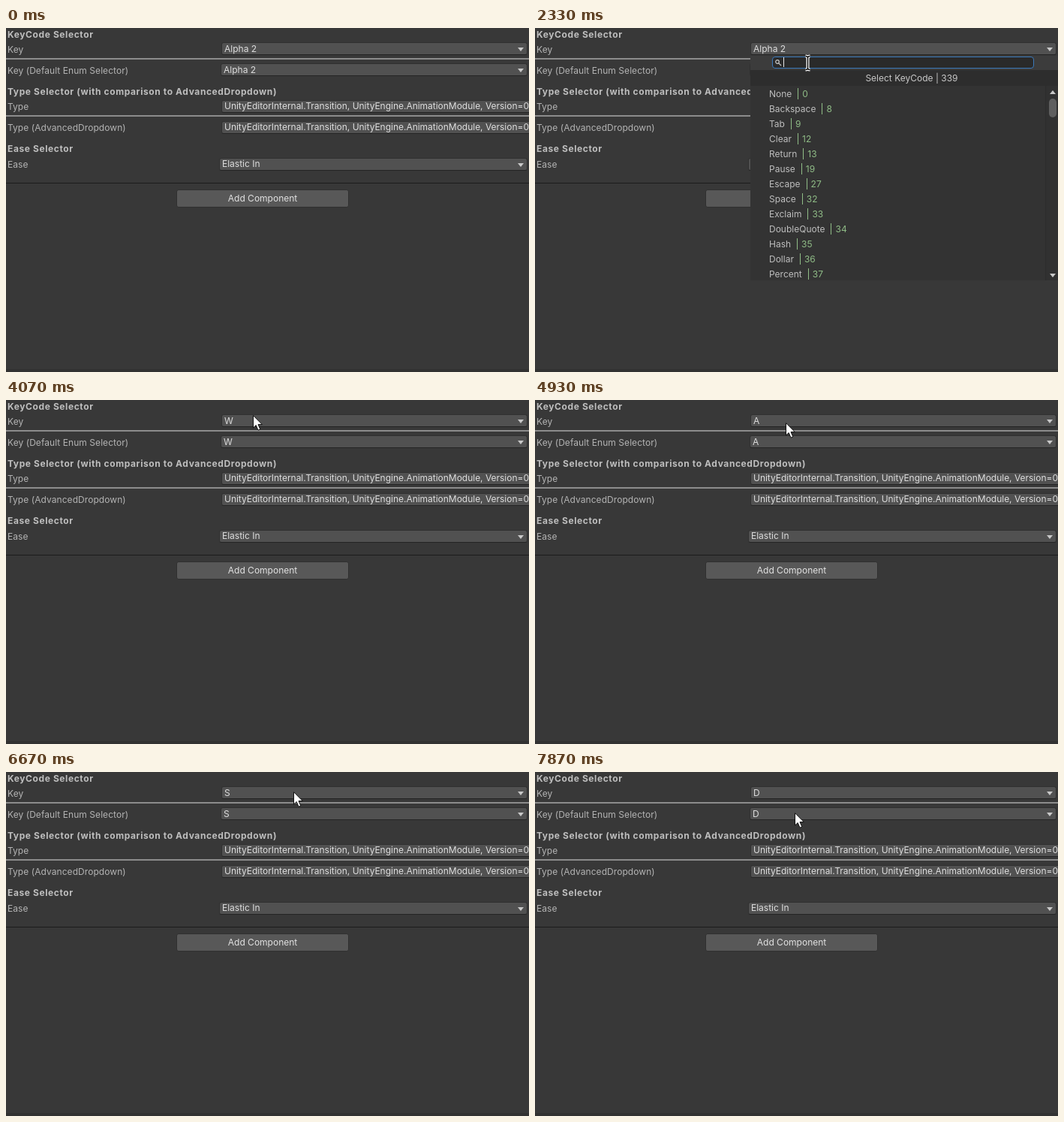
Recreate the animation shown at these times as an HTML page. Size 697 by 458 pixels, loop 8 s.

```html
<!DOCTYPE html>
<html lang="en">
<head>
<meta charset="utf-8">
<title>Selector inspector</title>
<style>
  html, body { margin: 0; width: 100%; height: 100%; overflow: hidden; background: #383838; }
  #stage { position: relative; width: 697px; height: 458px; overflow: hidden; background: #383838;
    font: 12px/16px Inter, sans-serif; color: #b4b4b4; white-space: pre; }
  #stage * { box-sizing: border-box; }
  #stage > *, #popup > * { position: absolute; }
  .label { left: 2px; margin-top: 1px; letter-spacing: .06px; }
  h2 { left: 2px; margin: 1px 0 0; font: bold 12px/16px Inter, sans-serif; letter-spacing: .6px; color: #bebebe; }
  .field { height: 17px; padding-left: 3px; line-height: 15px; border: 1px solid #303030; border-bottom-color: #242424;
    border-radius: 3px; background: #515151; color: #dedede; }
  .drop::after { content: ""; position: absolute; right: 4px; top: 6px; border: solid transparent;
    border-width: 5px 4.5px 0; border-top-color: #c8c8c8; }
  .type { left: 287px; width: 430px; line-height: 14px; letter-spacing: -.02px; }
  .rule { left: 0; width: 697px; height: 2px; background: #8c8c8c; }
  .split { left: 0; top: 206px; width: 697px; height: 1px; background: #1c1c1c; }
  .button { left: 227px; top: 215px; width: 230px; height: 24px; line-height: 22px; text-align: center;
    border: 1px solid #303030; border-radius: 3px; background: #585858; color: #e2e2e2; }
  .foot { left: 0; top: 454px; width: 697px; height: 4px; background: #323232; }
  #popup { left: 287px; top: 37px; width: 410px; height: 299px; background: #333; overflow: hidden; }
  .bar { left: 0; top: 0; width: 410px; height: 19px; background: #3c3c3c; }
  .search { left: 29px; top: 1px; width: 349px; height: 16px; 
    border: 1.5px solid #3a79bb; border-radius: 4px; background: #2a2a2a; color: #d8d8d8; }
  .search svg { position: absolute; left: 3px; top: 3px; }
  #query { position: absolute; left: 14px; top: 0; line-height: 14px; }
  #query::after { content: ""; position: absolute; left: 100%; top: 0; width: 1px; height: 13px; background: #e8e8e8; }
  .title { left: 0; top: 19px; width: 410px; height: 21px; padding: 1px 0 0 20px; line-height: 20px; text-align: center;
    background: #2d2d2d; color: #c8c8c8; }
  #list { left: 25px; top: 41px; margin: 0; padding: 0; list-style: none; line-height: 20px; color: #bebebe; }
  #list li { height: 20px; }
  #list b { font-weight: 400; color: #90bd87; }
  #list b::before { content: ""; display: inline-block; width: 1px; height: 15px; margin: 0 5px 0 8px;
    background: #90bd87; vertical-align: -3px; }
  .track { left: 393px; top: 40px; width: 17px; height: 259px; border-left: 1px solid #2c2c2c; background: #313131; }
  .track::before, .track::after { content: ""; position: absolute; left: 5px; border: solid transparent; }
  .track::before { top: 6px; border-width: 0 4px 5px; border-bottom-color: #c8c8c8; }
  .track::after { bottom: 4px; border-width: 5px 4px 0; border-top-color: #c8c8c8; }
  #thumb { position: absolute; left: 4px; top: 17px; width: 10px; height: 25px; border-radius: 5px; background: #5f5f5f; }
  #arrow, #beam { left: 0; top: 0; overflow: visible; }
</style>
</head>
<body>
<div id="stage">
  <h2 style="top:0">KeyCode Selector</h2>
  <div class="label" style="top:20px">Key</div>
  <div class="field drop key" style="left:287px;top:19px;width:408px"></div>
  <div class="rule" style="top:40px"></div>
  <div class="label" style="top:48px">Key (Default Enum Selector)</div>
  <div class="field drop key" style="left:286px;top:47px;width:409px"></div>

  <h2 style="top:76px">Type Selector (with comparison to AdvancedDropdown)</h2>
  <div class="label" style="top:96px">Type</div>
  <div class="field type" style="top:96px">UnityEditorInternal.Transition, UnityEngine.AnimationModule, Version=0</div>
  <div class="rule" style="top:116px"></div>
  <div class="label" style="top:124px">Type (AdvancedDropdown)</div>
  <div class="field type" style="top:124px">UnityEditorInternal.Transition, UnityEngine.AnimationModule, Version=0</div>

  <h2 style="top:152px">Ease Selector</h2>
  <div class="label" style="top:173px">Ease</div>
  <div class="field drop" style="left:284px;top:173px;width:411px;line-height:14px">Elastic In</div>
  <div class="split"></div>
  <div class="button">Add Component</div>
  <div class="foot"></div>

  <div id="popup">
    <div class="bar"></div>
    <div class="search"><svg width="9" height="9" fill="none" stroke="#c8c8c8" stroke-width="1.2"><circle cx="3" cy="3" r="2.3"/><path d="M4.8 4.8 8 8"/></svg><span id="query"></span></div>
    <div class="title">Select KeyCode | 339</div>
    <ul id="list"></ul>
    <div class="track"><div id="thumb"></div></div>
  </div>

  <svg id="arrow" width="14" height="22"><path d="M.5 .7V17L4.2 13.6 7 20.2 9.8 19 7 12.6H12.3Z" fill="#fff" stroke="#111" stroke-width="1"/></svg>
  <svg id="beam" width="1" height="1" fill="none">
    <defs><path id="stem" d="M-3-9Q0-9 0-7Q0-9 3-9M0-7V7M-3 9Q0 9 0 7Q0 9 3 9"/></defs>
    <use href="#stem" stroke="#fff" stroke-width="4"/>
    <use href="#stem" stroke="#000" stroke-width="1.4"/>
  </svg>
</div>
<script>
const LOOP = 8000, TICK = 1000 / 15, ROWS = 13;
const $ = id => document.getElementById(id);

const codes = ('None 0,Backspace 8,Tab 9,Clear 12,Return 13,Pause 19,Escape 27,Space 32,Exclaim 33,DoubleQuote 34,' +
  'Hash 35,Dollar 36,Percent 37,Ampersand 38,Quote 39,LeftParen 40,RightParen 41,Asterisk 42,Plus 43,Minus 45,' +
  'Slash 47,Semicolon 59,Less 60,Underscore 95,A 97,D 100,S 115,W 119,Delete 127,Keypad0 256,Keypad1 257,' +
  'Keypad2 258,Keypad3 259,Keypad4 260,Keypad5 261,Keypad6 262,Keypad7 263,UpArrow 273,DownArrow 274,' +
  'RightArrow 275,LeftArrow 276,LeftWindows 311,RightWindows 312').split(',').map(s => s.split(' '));

// Each state: start time, chosen key, search text (null while the popup is closed)
const states = [
  [0, 'Alpha 2', null], [1930, 'Alpha 2', ''], [2870, 'Alpha 2', 'w'],
  [3070, 'W', null], [4200, 'W', ''], [4330, 'W', 'a'],
  [4930, 'A', null], [5270, 'A', ''], [5530, 'A', 's'],
  [6000, 'S', null], [6800, 'S', ''], [7130, 'S', 'd'],
  [7400, 'D', null]
];

// Pointer path: time, x, y, and whether it is a text beam from there on
const path = [
  [70, 677, 437], [200, 570, 275], [330, 514, 196], [470, 513, 196], [530, 511, 196],
  [600, 511, 196], [800, 458, 140], [1000, 386, 68], [1130, 366, 46], [1400, 349, 30],
  [2130, 349, 30], [2200, 357, 41, 1], [2330, 363.5, 46.5, 1],
  [3070, 363, 45], [3600, 363, 45], [3670, 350, 42], [3870, 350, 42], [4070, 329, 20],
  [4200, 329, 20], [4330, 331, 20], [4530, 331, 20], [4670, 334, 30], [4930, 334, 30],
  [5130, 345, 20], [5270, 345, 20], [5330, 349, 38, 1], [5530, 355, 46, 1],
  [6000, 355, 45], [6400, 355, 45], [6670, 383, 26], [6800, 383, 26], [6930, 378, 38, 1],
  [7130, 370, 46, 1], [7400, 370, 45], [7870, 346, 54]
];

const lastBefore = (rows, t) => rows.findLastIndex(row => row[0] <= t);

function pointerAt(t) {
  const i = lastBefore(path, t);
  if (i < 0) return null;
  const a = path[i], b = path[i + 1] || a;
  const f = a[3] !== b[3] || a === b ? 0 : (t - a[0]) / (b[0] - a[0]);
  return { x: a[1] + (b[1] - a[1]) * f, y: a[2] + (b[2] - a[2]) * f, beam: a[3] };
}

function matches(query) {
  const exact = ([name]) => name.toLowerCase() === query;
  return codes.filter(([name]) => name.toLowerCase().includes(query))
    .sort((a, b) => exact(b) - exact(a));
}

function showState([, key, query]) {
  document.querySelectorAll('.key').forEach(field => field.textContent = key);
  $('popup').hidden = query === null;
  if (query === null) return;
  const found = matches(query);
  $('query').textContent = query;
  $('list').innerHTML = found.slice(0, ROWS).map(([name, code]) => `<li>${name}<b>${code}</b></li>`).join('');
  $('thumb').hidden = found.length <= ROWS;
}

function showPointer(p) {
  $('arrow').style.display = p && !p.beam ? '' : 'none';
  $('beam').style.display = p && p.beam ? '' : 'none';
  if (!p) return;
  const shape = $(p.beam ? 'beam' : 'arrow');
  const snap = v => p.beam ? Math.floor(v) + .5 : Math.round(v);
  shape.style.transform = `translate(${snap(p.x)}px, ${snap(p.y)}px)`;
}

let shown = -1;
const start = performance.now();
function draw(now) {
  const elapsed = Math.max(0, now - start) % LOOP;
  // Picture times fall on fifteenths of a second, rounded to 10 ms
  const t = Math.round(Math.floor((elapsed + 4) / TICK) * TICK / 10) * 10 % LOOP;
  const state = lastBefore(states, t);
  if (state !== shown) showState(states[shown = state]);
  showPointer(pointerAt(t));
  requestAnimationFrame(draw);
}
draw(start);
</script>
</body>
</html>
```
